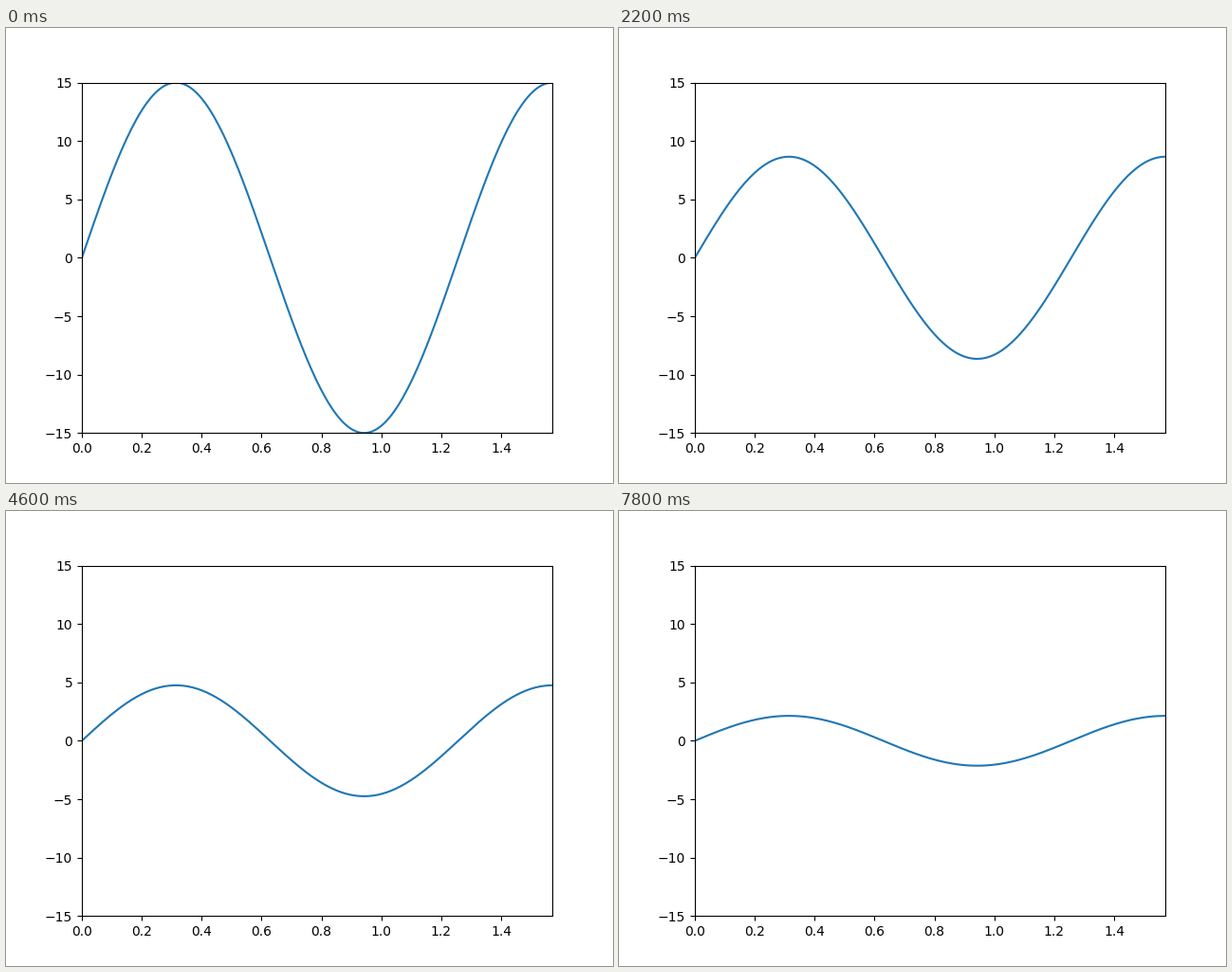
A matplotlib script for the animation above (8000 ms loop, 640x480 px).

```python
import numpy as np
import matplotlib.pyplot as plt
from matplotlib.animation import FuncAnimation

FRAMES = 40
INTERVAL = 200
AMPLITUDE = 15
DECAY = 0.05  # per frame

fig, ax = plt.subplots(figsize=(6.4, 4.8), dpi=100)
ax.set_xlim(0, np.pi / 2)
ax.set_ylim(-AMPLITUDE, AMPLITUDE)

x = np.linspace(0, np.pi / 2, 200)
wave = AMPLITUDE * np.sin(5 * x)
line, = ax.plot(x, wave, color="#1f77b4", lw=1.5)


def update(frame):
    line.set_ydata(wave * np.exp(-DECAY * frame))
    return line,


anim = FuncAnimation(fig, update, frames=FRAMES, interval=INTERVAL,
                     repeat=True, repeat_delay=0)
plt.show()
```
